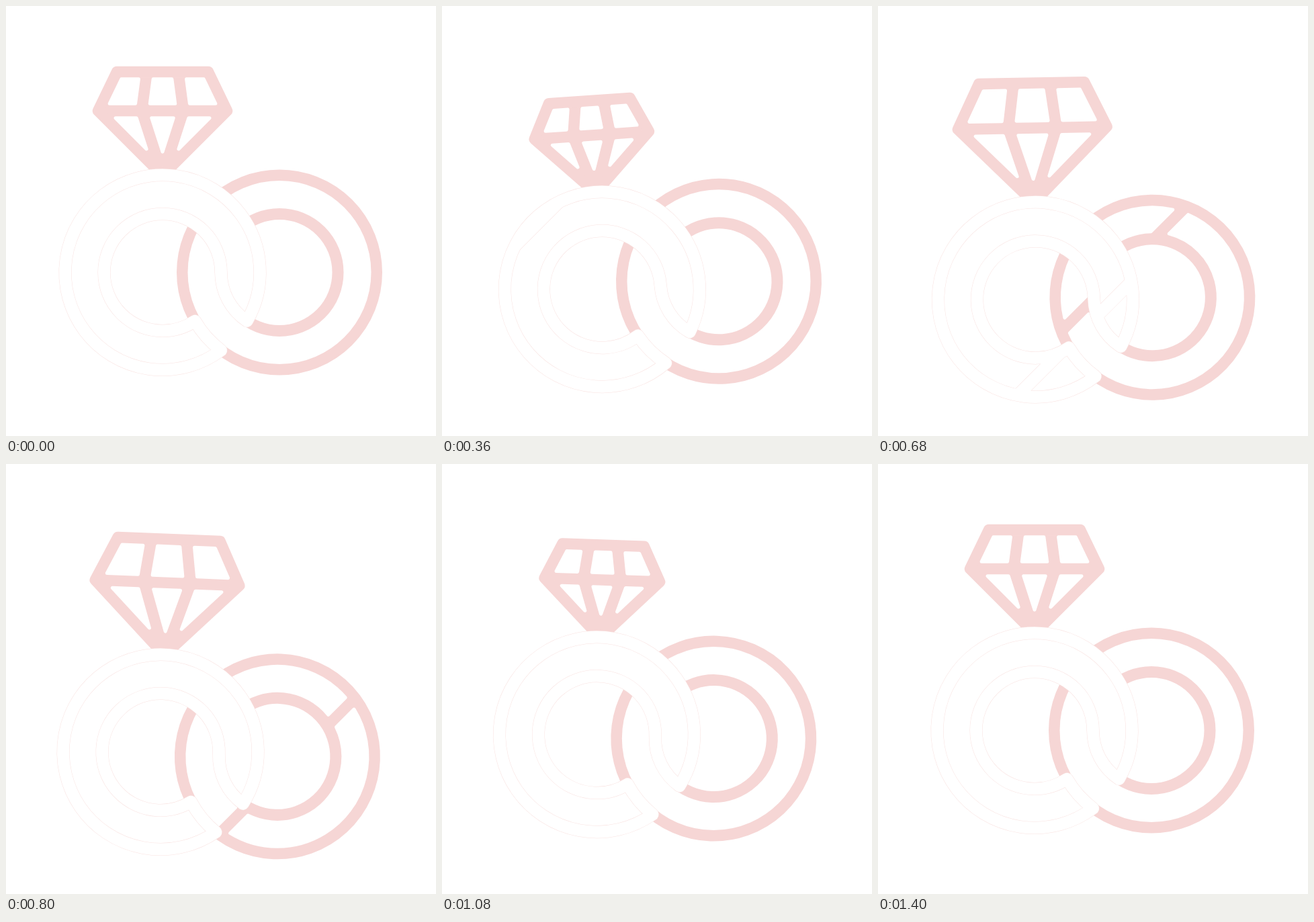
Animation of 640 by 640 pixels, one loop 1440 ms. Source, as an HTML page with a canvas:

```html
<!DOCTYPE html>
<html>
<head>
<meta charset="utf-8">
<style>
html, body { margin: 0; height: 100%; overflow: hidden; background: #fff; }
canvas { display: block; }
</style>
</head>
<body>
<canvas id="stage" width="640" height="640"></canvas>
<script>
const ctx = document.getElementById('stage').getContext('2d');
const { PI, sin, cos, acos, hypot } = Math;
const PINK = '#f6d6d5', HAIRLINE = '#f9e2e0', WHITE = '#fff';
const LOOP = 1440, STEP = 40;
const LEFT = 233, RIGHT = 407, RING_Y = 396.5, OUTER = 145, INNER = 87;
const ROUND = 2.5; // corner radius of the white cells

// Keyframes as [time, value], eased between neighbours.
const TILT = [[80, 0], [490, -5.1], [870, 3], [1400, 0]];
const DROP = [[80, 0], [640, 38.8], [700, 38.8], [1255, 0]];
const GEM_SCALE = [[80, 1], [360, .888], [720, 1.164], [1030, .888], [1400, 1]];

function track(keys, t) {
  const next = keys.findIndex(k => k[0] > t);
  if (next < 0) return keys[keys.length - 1][1];
  if (next === 0) return keys[0][1];
  const [t0, a] = keys[next - 1], [t1, b] = keys[next];
  const u = (t - t0) / (t1 - t0);
  return a + (b - a) * u * u * (3 - 2 * u);
}

function stroke(color, width) {
  ctx.strokeStyle = color;
  ctx.lineWidth = width;
  ctx.stroke();
}

function paintCell() {
  ctx.fillStyle = WHITE;
  ctx.fill('evenodd');
  stroke(WHITE, 2 * ROUND);
}

function polygon(points) {
  ctx.beginPath();
  points.forEach(p => ctx.lineTo(...p));
  ctx.closePath();
}

// Shrinks a clockwise convex polygon by d on every side.
function inset(points, d) {
  const n = points.length;
  const normals = points.map(([x, y], i) => {
    const [x2, y2] = points[(i + 1) % n], len = hypot(x2 - x, y2 - y);
    return [(y - y2) / len, (x2 - x) / len];
  });
  return points.map(([x, y], i) => {
    const [ax, ay] = normals[(i + n - 1) % n], [bx, by] = normals[i];
    const k = d / (1 + ax * bx + ay * by);
    return [x + k * (ax + bx), y + k * (ay + by)];
  });
}

function drawGem(scale) {
  const at = points => points.map(([x, y]) => [x * scale, y * scale]);
  const cell = points => {
    polygon(inset(at(points), 8.25 + ROUND));
    paintCell();
  };
  ctx.save();
  ctx.translate(LEFT, 252);
  polygon(at([[-68, -154], [68, -154], [96, -96], [0, 0], [-96, -96]]));
  ctx.fillStyle = PINK;
  ctx.fill();
  stroke(PINK, 16.5);
  cell([[-23.3, -154], [23.3, -154], [31, -96], [-31, -96]]);
  cell([[-31, -96], [31, -96], [0, 0]]);
  for (let side = 0; side < 2; side++) {
    cell([[-68, -154], [-23.3, -154], [-31, -96], [-96, -96]]);
    cell([[-96, -96], [-31, -96], [0, 0]]);
    ctx.scale(-1, 1);
  }
  ctx.restore();
}

// Part of the band lying further than d from the ring centre along dir.
function bandCell(dir, d) {
  const R = 136.5 - ROUND, r = 95.5 + ROUND;
  if (d >= R) return;
  const a = acos(Math.max(-1, d / R));
  ctx.beginPath();
  ctx.arc(RIGHT, RING_Y, R, dir - a, dir + a);
  if (d <= -r) {
    ctx.closePath();
    ctx.moveTo(RIGHT + r, RING_Y);
    ctx.arc(RIGHT, RING_Y, r, 0, 2 * PI);
  } else if (d < r) {
    const b = acos(d / r);
    ctx.arc(RIGHT, RING_Y, r, dir + b, dir - b, true);
  }
  ctx.closePath();
  paintCell();
}

function drawRightRing(dir, d) {
  ctx.beginPath();
  ctx.arc(RIGHT, RING_Y, 115.75, 0, 2 * PI);
  stroke(PINK, 74.5);
  bandCell(dir, d + 8.2 + ROUND);
  bandCell(dir + PI, -d + 8.2 + ROUND);
}

function drawLeftRing(dir, d) {
  // Angles where the circles of both rings cross.
  const gap = RIGHT - LEFT;
  const p = acos((OUTER ** 2 + gap ** 2 - INNER ** 2) / (2 * OUTER * gap));
  const q = acos(gap / 2 / OUTER);
  const s = acos((INNER ** 2 + gap ** 2 - OUTER ** 2) / (2 * INNER * gap));
  const band = new Path2D();
  band.arc(LEFT, RING_Y, OUTER, q, p + 2 * PI);
  band.arc(RIGHT, RING_Y, INNER, PI - s, PI);
  band.arc(LEFT, RING_Y, INNER, 0, s, true);
  band.arc(RIGHT, RING_Y, OUTER, PI - p, PI - q, true);
  band.closePath();

  ctx.fillStyle = WHITE;
  ctx.fill(band);
  for (const [color, width] of [[HAIRLINE, 19], [WHITE, 18]]) {
    ctx.strokeStyle = color;
    ctx.lineWidth = width;
    ctx.stroke(band);
    ctx.save();
    ctx.clip(band);
    ctx.translate(LEFT, RING_Y);
    ctx.rotate(dir);
    ctx.beginPath();
    ctx.moveTo(d, -200);
    ctx.lineTo(d, 200);
    ctx.stroke();
    ctx.restore();
  }
}

function draw(t) {
  const tilt = track(TILT, t) * PI / 180, drop = track(DROP, t);
  // Distance from a ring centre to the diagonal x + y = sum on the stage.
  const shine = (ringX, sum) => {
    const x = ringX - 320, y = RING_Y - 320;
    const cx = 320 + x * cos(tilt) - y * sin(tilt);
    const cy = 320 + x * sin(tilt) + y * cos(tilt) + drop;
    return (sum - cx - cy) / Math.SQRT2;
  };
  const dir = PI / 4 - tilt;

  ctx.fillStyle = WHITE;
  ctx.fillRect(0, 0, 640, 640);
  ctx.save();
  ctx.lineJoin = 'round';
  ctx.translate(320, 320 + drop);
  ctx.rotate(tilt);
  ctx.translate(-320, -320);
  drawGem(track(GEM_SCALE, t));
  drawRightRing(dir, shine(RIGHT, 683 + .925 * (t - 600)));
  drawLeftRing(dir, shine(LEFT, 707 + 1.005 * (t - 600)));
  ctx.restore();
}

const start = performance.now();
function frame() {
  const t = (performance.now() - start) % LOOP;
  draw(Math.floor(t / STEP) * STEP);
  requestAnimationFrame(frame);
}
frame();
</script>
</body>
</html>
```
